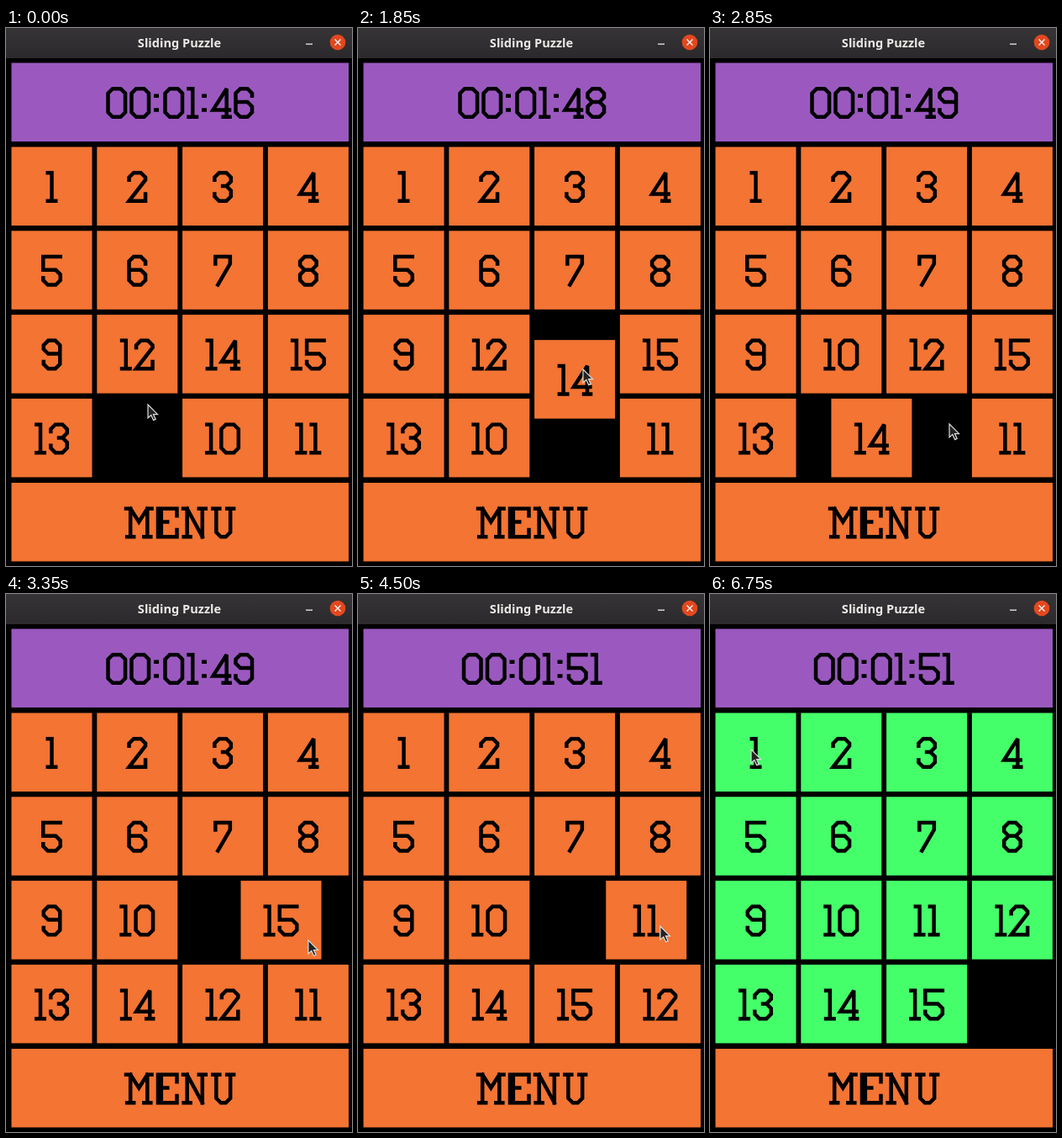
An HTML page with a canvas for the animation above (6900 ms loop, 412 px wide and 640 px high).

```html
<!DOCTYPE html>
<html lang="en">
<head>
<meta charset="utf-8">
<title>Sliding Puzzle</title>
<style>
html, body { margin: 0; width: 412px; height: 640px; overflow: hidden; background: #000; }
canvas { display: block; }
</style>
</head>
<body>
<canvas id="stage" width="412" height="640" aria-label="Sliding Puzzle"></canvas>
<script>
const ctx = document.getElementById('stage').getContext('2d');
const LOOP = 6900, STEP = 50, FIRST_MOVE = 564, SLIDE = 299, FIRST_TICK = 450;
const ORANGE = '#f37433', GREEN = '#44ff69', PURPLE = '#9b59c0';

// Slab lettering on a 5 x 5 grid of points a..y, row by row.
// A capital cuts the corner; "-v" is a foot or head centred on v.
const COLS = [0, 0.17, 0.5, 0.83, 1], ROWS = [0, 0.25, 0.47, 0.75, 1];
const CAP = 38, PEN = 4.5, CUT = 5.5, GAP = 3, SERIF = 4;
const shapes = {
  0: 'kAEYUk', 1: 'acw uy', 2: 'fAEjuyt', 3: 'fAEOm mOYUp', 4: 'xdpt -x',
  5: 'eakOYUp', 6: 'jEAUYOk', 7: 'faejv', 8: 'mKAEOm mOYUKm', 9: 'pUYEAKo',
  ':': 'gh qr', M: 'abv bmd edx -v -x', E: 'jeauyt bv lm', N: 'abv bx dx -d -v', U: 'bVXd -b -d'
};
const widths = { 0: 25, 1: 14, 5: 25, 7: 22, ':': 9, M: 35, E: 27, N: 32, U: 30 };
const widthOf = c => widths[c] || 24;

const mix = (a, b, p) => a + (b - a) * p;

function gridPoint(letter, width) {
  const i = letter.toLowerCase().charCodeAt(0) - 97;
  return [mix(PEN / 2, width - PEN / 2, COLS[i % 5]), mix(PEN / 2, CAP - PEN / 2, ROWS[Math.floor(i / 5)])];
}

function toward([x, y], [u, v], distance) {
  const p = distance / Math.hypot(u - x, v - y);
  return [mix(x, u, p), mix(y, v, p)];
}

function glyph(c) {
  const path = new Path2D();
  for (const run of shapes[c].split(' ')) {
    if (run[0] === '-') {
      const [x, y] = gridPoint(run[1], widthOf(c));
      path.moveTo(x - SERIF, y);
      path.lineTo(x + SERIF, y);
      continue;
    }
    const pts = [...run].map(k => gridPoint(k, widthOf(c)));
    path.moveTo(...pts[0]);
    for (let i = 1; i < pts.length; i++) {
      if (run[i] < 'a') {
        path.lineTo(...toward(pts[i], pts[i - 1], CUT));
        path.lineTo(...toward(pts[i], pts[i + 1], CUT));
      } else path.lineTo(...pts[i]);
    }
  }
  return path;
}
const glyphs = {};
for (const c in shapes) glyphs[c] = glyph(c);

// Each tile named here slides into the gap in turn; 0 is a pause
const start = [1, 2, 3, 4, 5, 6, 7, 8, 9, 12, 14, 15, 13, 0, 10, 11];
const order = [12, 0, 12, 10, 14, 12, 10, 14, 12, 15, 11, 12, 15, 11, 12];
const SOLVED = FIRST_MOVE + order.length * SLIDE;
const cells = start.slice();
const slides = order.map((n, i) => {
  const from = cells.indexOf(n), to = cells.indexOf(0);
  cells[from] = 0;
  cells[to] = n;
  return { n, from, to, time: FIRST_MOVE + i * SLIDE };
}).filter(s => s.n);

const cellX = i => 6.5 + (i % 4) * 101.8;
const cellY = i => 141.5 + (i >> 2) * 99.8;

// The pointer meets each tile as it sets off, and rests or strays between
const pointer = [
  [0, 169, 448], [1100, 155, 482], [1850, 268, 406], [2850, 285, 471],
  [3800, 261, 499], [5050, 287, 494], [5650, 287, 494], [6750, 49, 185],
  ...slides.map(s => [s.time, cellX(s.from) + 48, cellY(s.from) + 47])
].sort((a, b) => a[0] - b[0]);
const arrow = new Path2D('M0 0V16L3.8 12.6L6.6 18.6L9.2 17.4L6.5 11.6H11.5Z');

function label(text, x, y) {
  const width = [...text].reduce((sum, c) => sum + widthOf(c) + GAP, -GAP);
  ctx.save();
  ctx.translate(x - width / 2, y);
  ctx.strokeStyle = '#000';
  ctx.lineWidth = PEN;
  ctx.lineCap = 'square';
  ctx.miterLimit = 3;
  for (const c of text) {
    ctx.stroke(glyphs[c]);
    ctx.translate(widthOf(c) + GAP, 0);
  }
  ctx.restore();
}

function panel(text, x, y, w, color) {
  ctx.fillStyle = color;
  ctx.fillRect(x, y, w, 93.5);
  label(text, x + w / 2, y + 28.5);
}

function titleBar() {
  const shade = ctx.createLinearGradient(0, 0, 0, 36);
  shade.addColorStop(0, '#363436');
  shade.addColorStop(1, '#2b292b');
  ctx.fillStyle = shade;
  ctx.fillRect(0, 0, 412, 36);
  ctx.fillStyle = '#eceae7';
  ctx.font = 'bold 14.6px "Noto Sans", "Open Sans", sans-serif';
  ctx.textAlign = 'center';
  ctx.fillText('Sliding Puzzle', 206.5, 22.5);
  ctx.fillRect(357, 18.5, 8, 1.3);
  ctx.fillStyle = '#e2481f';
  ctx.beginPath();
  ctx.arc(395, 17, 9.3, 0, 7);
  ctx.fill();
  ctx.strokeStyle = '#fff';
  ctx.lineWidth = 1.3;
  ctx.stroke(new Path2D('M391.5 13.5L398.5 20.5M398.5 13.5L391.5 20.5'));
}

function tile(n, t) {
  const home = start.indexOf(n);
  const { from, to, time } = slides.findLast(s => s.n === n && s.time <= t) || { from: home, to: home, time: 0 };
  const p = Math.min(1, (t - time) / SLIDE);
  panel(String(n), mix(cellX(from), cellX(to), p), mix(cellY(from), cellY(to), p),
    96, t < SOLVED ? ORANGE : GREEN);
}

function drawPointer(t) {
  const next = Math.max(1, pointer.findIndex(k => k[0] >= t));
  const [t0, x0, y0] = pointer[next - 1], [t1, x1, y1] = pointer[next];
  const p = Math.min(1, (t - t0) / (t1 - t0)), ease = p * p * (3 - 2 * p);
  ctx.save();
  ctx.translate(mix(x0, x1, ease), mix(y0, y1, ease));
  ctx.fillStyle = '#222';
  ctx.strokeStyle = '#ddd';
  ctx.lineWidth = 1.2;
  ctx.fill(arrow);
  ctx.stroke(arrow);
  ctx.restore();
}

function draw(now) {
  const t = Math.min(6750, Math.floor((now % LOOP) / STEP) * STEP);
  const seconds = 46 + Math.floor((Math.min(t, SOLVED) - FIRST_TICK) / 1000 + 1);
  ctx.fillStyle = '#000';
  ctx.fillRect(0, 0, 412, 640);
  titleBar();
  panel('00:01:' + seconds, 6.5, 41.5, 401.5, PURPLE);
  for (let n = 1; n < 16; n++) tile(n, t);
  panel('MENU', 6.5, 541, 401.5, ORANGE);
  drawPointer(t);
}

let origin;
function loop(now) {
  origin ??= now;
  draw(now - origin);
  requestAnimationFrame(loop);
}
requestAnimationFrame(loop);
</script>
</body>
</html>
```
